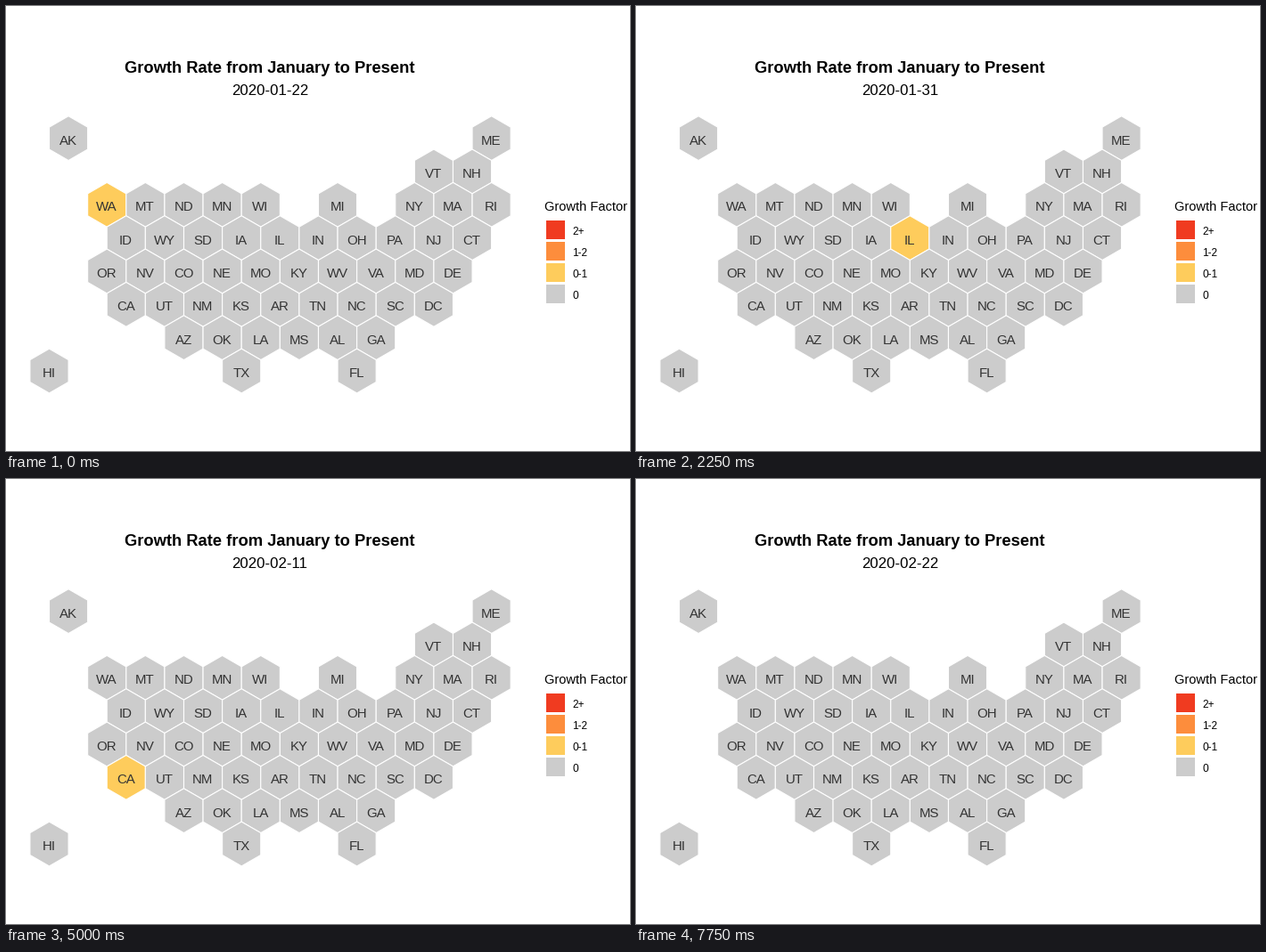
Recreate the animation shown at these times as a matplotlib script. Size 700 px wide and 500 px high, loop 8000 ms.

```python
import matplotlib.pyplot as plt
from matplotlib.animation import FuncAnimation
from matplotlib.patches import Rectangle, RegularPolygon

W, H, DPI = 700, 500, 100
DAYS, STEP_MS = 32, 250
NONE, LOW, MID, HIGH = "#CCCCCC", "#FECC5C", "#FD8D3C", "#F03B20"

# Each row: (row index, first half-column, states two half-columns apart)
ROWS = [
    (0, 1, "AK"), (0, 23, "ME"),
    (1, 20, "VT NH"),
    (2, 3, "WA MT ND MN WI"), (2, 15, "MI"), (2, 19, "NY MA RI"),
    (3, 4, "ID WY SD IA IL IN OH PA NJ CT"),
    (4, 3, "OR NV CO NE MO KY WV VA MD DE"),
    (5, 4, "CA UT NM KS AR TN NC SC DC"),
    (6, 7, "AZ OK LA MS AL GA"),
    (7, 0, "HI"), (7, 10, "TX"), (7, 16, "FL"),
]
X0, Y0, HALF, RADIUS = 48.5, 148.6, 21.57, 24.9

# Days counted from 22 January
GROWTH = {
    0: {"WA": LOW},
    2: {"IL": LOW},
    4: {"CA": MID, "AZ": LOW},
    9: {"IL": LOW},
    10: {"CA": LOW, "MA": LOW},
    12: {"CA": MID},
    14: {"WI": LOW},
    20: {"CA": LOW},
    22: {"CA": LOW},
    30: {"CA": MID},
}

plt.rcParams["font.family"] = "Liberation Sans"
fig = plt.figure(figsize=(W / DPI, H / DPI), dpi=DPI, facecolor="white")
ax = fig.add_axes([0, 0, 1, 1])
ax.set_xlim(0, W)
ax.set_ylim(H, 0)
ax.axis("off")


def pt(px):
    return px * 72 / DPI


def label(x, y, text, px, **kw):
    return ax.text(x, y, text, fontsize=pt(px), va="baseline", **kw)


def date_text(day):
    n = 22 + day
    return f"2020-01-{n:02d}" if n <= 31 else f"2020-02-{n - 31:02d}"


hexes = {}
for row, col, states in ROWS:
    for i, state in enumerate(states.split()):
        x = X0 + HALF * (col + 2 * i)
        y = Y0 + 1.5 * RADIUS * row
        hexes[state] = ax.add_patch(RegularPolygon(
            (x, y), 6, radius=RADIUS, fc=NONE, ec="white", lw=pt(1.1)))
        label(x - 0.3, y + 7, state, 15, ha="center", color="#333333", zorder=3)

label(295.7, 75, "Growth Rate from January to Present", 18.4,
      ha="center", weight="bold")
date = label(296, 100, date_text(0), 16.7, ha="center")

label(603.5, 230, "Growth Factor", 14.67)
for i, (color, name) in enumerate(
        [(HIGH, "2+"), (MID, "1-2"), (LOW, "0-1"), (NONE, "0")]):
    top = 241 + 24 * i
    ax.add_patch(Rectangle((606, top), 21, 21, fc=color, lw=0))
    label(635, top + 16, name, 11.9)


def update(day):
    colors = GROWTH.get(day, {})
    for state, patch in hexes.items():
        patch.set_facecolor(colors.get(state, NONE))
    date.set_text(date_text(day))
    return [date, *hexes.values()]


anim = FuncAnimation(fig, update, frames=DAYS, interval=STEP_MS,
                     repeat=True, repeat_delay=0, blit=False)
plt.show()
```
